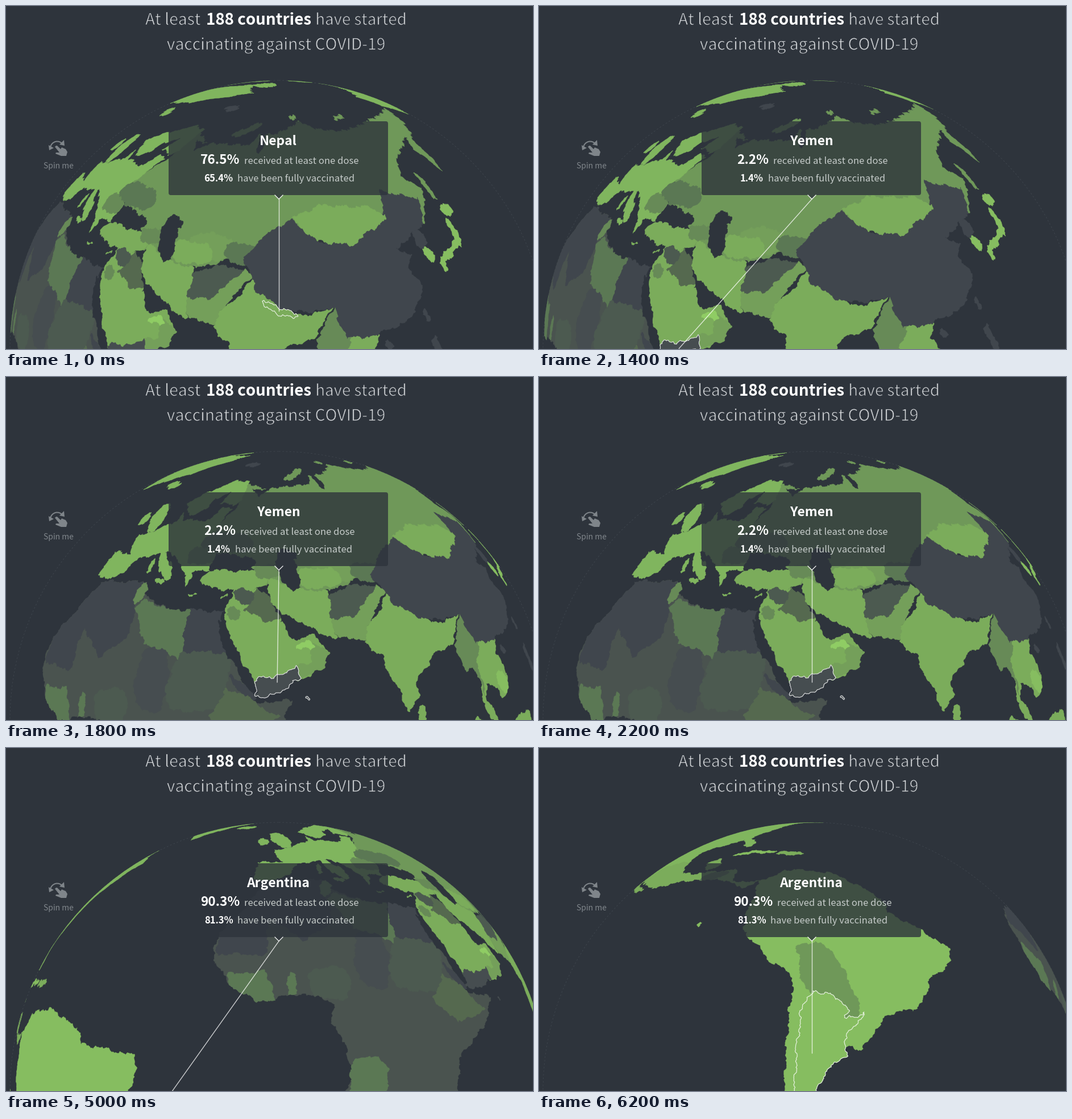
Recreate the animation shown at these times as a matplotlib script. Size 927x604 px, loop 8 s.

```python
import numpy as np
import matplotlib.pyplot as plt
from matplotlib import patheffects
from matplotlib.animation import FuncAnimation
from matplotlib.collections import PolyCollection
from matplotlib.patches import Arc, Circle, FancyBboxPatch, Polygon

W, H, DPI = 927, 604, 100
CX, CY, R = 480, 604, 473
STEP, LOOP = 200, 8000
TURN = 757          # length of one globe turn in ms
TILT = 8.2          # the view centre lies this far south of the focus

# Shades from no data to high coverage
SEA = "#2e343c"
NONE, LOW, DIM = "#40464d", "#464d50", "#4a534f"
D2, D3, D4 = "#4c5a50", "#55694f", "#5b7854"
M1, M2, M3 = "#678a57", "#6f9859", "#749f5a"
G1, G2, G3, TOP = "#7bac5b", "#80b55e", "#86bd60", "#8fcc64"

lands = []


def rough(points):
    """Close a lon/lat outline, subdivide it and make it jagged."""
    p = np.array(points, float).reshape(-1, 2)
    parts = []
    for a, b in zip(p, np.roll(p, -1, axis=0)):
        n = max(2, int(np.hypot(*(b - a)) / 0.25))
        parts.append(a + (b - a) * (np.arange(n) / n)[:, None])
    lon, lat = np.concatenate(parts).T
    dx, dy = np.zeros_like(lon), np.zeros_like(lat)
    for k in (.8, 1.7, 3.1, 5.6, 9.1):
        amp = .24 / k ** .55
        dx += amp * np.sin(k * (lat + .35 * lon) + 2 * k)
        dy += amp * np.sin(k * (lon - .45 * lat) + 5 * k)
    return np.radians(lon + dx), np.radians(lat + dy)


def land(color, *points):
    """Outline through a few lon/lat key points."""
    shape = rough(points)
    lands.append((color, shape))
    return shape


def blob(color, lon, lat, w, h):
    """Rounded box around a centre, by half width and half height."""
    a = np.linspace(0, 2 * np.pi, 40, endpoint=False)
    c, s = np.cos(a), np.sin(a)
    x = lon + w * np.sign(c) * np.abs(c) ** .75
    y = lat + h * np.sign(s) * np.abs(s) ** .75
    return land(color, *np.column_stack((x, y)).ravel())


def strip(color, lon0, lat0, lon1, lat1, w):
    """Long lens between two ends, w degrees to either side."""
    k = np.cos(np.radians((lat0 + lat1) / 2))
    dx, dy = (lon1 - lon0) * k, lat1 - lat0
    a = np.linspace(0, 2 * np.pi, 40, endpoint=False)
    along = (1 - np.cos(a)) / 2
    side = w * np.sign(np.sin(a)) * np.abs(np.sin(a)) ** .8 / np.hypot(dx, dy)
    x = lon0 + (along * dx - side * dy) / k
    y = lat0 + along * dy + side * dx
    return land(color, *np.column_stack((x, y)).ravel())


# Russia and Central Asia
land(M2, 29, 69, 41, 67, 33, 66.5, 38, 64.2, 45, 67.5, 67, 69, 70, 72.8, 80, 73,
     104, 77.5, 113, 74, 130, 71, 160, 69.8, 190, 66, 178, 62.5, 163, 59.5, 157, 51,
     156, 58, 162, 61.5, 143, 59.3, 135, 54.7, 140, 50, 132, 43, 110, 47, 80, 42,
     60, 36, 44, 38, 37, 45, 30, 46, 24, 52, 30, 60)
strip(M2, 52, 70.8, 68, 77, .9)
strip(M2, 142.3, 46, 142.8, 54.3, .6)
blob(M2, 100, 79.3, 4, .8)
blob(M2, 143, 75, 6, .6)
blob(M3, 64, 41.5, 7, 3)
blob(G1, 59, 39.5, 6, 2.5)
blob(D4, 74, 40.5, 5.5, 2.3)

# Europe
land(G2, 5, 60, 8, 58, 13, 56, 17, 59, 17.5, 62, 23, 65.7, 21.5, 61, 28, 60.5, 31, 63,
     29, 70, 20, 70, 13, 66)
land(G2, 8, 57, 10.5, 54.5, 21, 55, 24, 59.3, 28, 59.5, 24, 50, 28, 46, 28, 41.5,
     23, 40.5, 22.5, 36.7, 19.5, 41.5, 13, 45.5, 8, 44, 3, 43, 0, 39, -2, 36.8,
     -9, 37, -9, 43.3, -1.5, 43.5, -4.5, 48.3, 2, 50.5, 8, 54)
strip(G2, 9.5, 45.5, 16.8, 38, 1.2)
strip(G2, .5, 50, -5, 59, 1.7)
blob(M1, 24, 45, 4, 2.6)
blob(D4, 31, 48.8, 8.5, 2.8)
blob(G2, -8, 53.3, 1.9, 1.7)
blob(G2, -18.7, 64.9, 5, 1.3)
blob(NONE, 18, 79, 7, 1.3)
blob(G2, 14, 37.5, 1.4, .5)
blob(G2, 9, 41, .6, 1.7)
blob(G2, 25, 35.2, 1.2, .2)

# Middle East and South Asia
blob(G1, 35.3, 39, 9.2, 2.4)
blob(G1, 33.2, 35.1, .8, .3)
blob(M1, 45, 41.3, 4, 1.8)
land(G1, 44.5, 39.5, 54, 37, 61, 36, 61.5, 25.3, 57, 26.5, 50, 30, 46, 34)
land(G1, 36, 36.7, 42.5, 37, 48, 30, 51.5, 25, 56.4, 26, 59.8, 22.5, 55, 17.2,
     43.3, 12.7, 35, 28, 34.5, 31.5)
land(D3, 42.3, 37, 46, 34.5, 48, 30, 45, 29.2, 39, 32)
blob(D2, 38.8, 35.1, 2.8, 1.7)
blob(M1, 36.8, 31, 1.7, 1.2)
land(M3, 52, 19, 53, 16.6, 57.8, 19, 59.8, 22.5, 56, 24.5, 55, 20)
blob(TOP, 54.3, 23.7, 2, .8)
yemen = land(LOW, 43, 12.7, 42.7, 16.4, 47, 17, 52, 19, 53, 16.6, 49, 14.2, 45, 12.8)
island = blob(LOW, 54, 12.5, .5, .2)
land(M3, 61, 29.8, 70, 34, 74.5, 37, 77, 35.5, 70, 28, 71, 24.5, 67, 25, 61.7, 25.2)
land(D2, 61, 35.3, 67, 37.3, 74.5, 37.2, 70, 33, 66.3, 29.8, 61, 29.8)
land(G1, 68.5, 23.6, 70, 28, 74.5, 31, 77, 35.5, 88, 27, 97, 28, 92, 22, 87, 21,
     80, 15, 80, 11.5, 77.5, 8.2, 73, 18, 72.5, 21, 69.5, 22)
blob(G1, 80.7, 7.7, .9, 1.7)

# East and Southeast Asia
land(G1, 97.6, 18.5, 101, 22, 108, 21.5, 106, 18.5, 109, 14, 108.5, 11, 105, 9,
     103, 11.5, 100, 13, 99.5, 9.5, 102, 6.5, 104, 1.5, 100.5, 4.5, 98.5, 9)
blob(G3, 106.5, 12.3, 2, 2.2)
land(M1, 92.5, 21.5, 97.5, 28, 101, 21.6, 98.5, 17, 99, 10.5, 97, 16.5, 94.5, 16)
land(NONE, 74, 39.5, 80, 45, 87.5, 49, 96, 42.7, 112, 45, 120, 48, 122, 53,
     135, 48.4, 131, 43, 121, 40, 118, 39, 122, 37, 119.5, 35, 122, 30, 118, 24.4,
     108, 21.6, 100, 21.5, 97.5, 28, 86, 28, 78.5, 32.5)
land(G1, 88, 49, 98, 52, 116, 49.8, 119.8, 46.7, 105, 41.7, 95, 43.5)
nepal = strip(G1, 79.9, 29.8, 88.5, 26.8, .75)
strip(NONE, 127, 42, 127.2, 37.8, 1.4)
blob(G3, 127.8, 36.2, 1.5, 1.7)
strip(G3, 130.5, 33.8, 141, 36.5, .9)
strip(G3, 139.5, 35, 141, 41.6, .9)
blob(G3, 130.8, 32.6, .8, 1.2)
blob(G3, 143, 43.3, 2.2, 1.4)
blob(NONE, 121, 23.7, .6, 1.5)
blob(NONE, 109.8, 19.2, 1, .8)
strip(NONE, 121.3, 18.7, 123.8, 12.5, .9)
blob(NONE, 124.5, 7.7, 1.8, 1.6)
strip(G1, 95.3, 5.7, 106, -6, 1.5)
blob(G1, 114, 1, 4.5, 4)

# Africa
land(DIM, -6, 35.8, 10, 37.2, 11, 34, 20, 31, 32, 31.2, 37.3, 20.5, 43, 11.5, 51, 11.8,
     47, 4, 39.5, -4, 40.5, -14, 35, -24, 27, -33.5, 18.5, -34, 12, -17, 13.5, -9,
     9, 0, 9, 4, 4, 6.4, -7.5, 4.4, -13, 8.5, -17.3, 14.7, -16.5, 21, -10, 29.5)
land(NONE, -6, 35.8, 9, 37, 10, 24, 3, 19.2, -5, 25, -5.5, 15.5, -16.3, 16,
     -16.5, 21, -10, 29.5)
blob(M1, 9.5, 34.5, 1.4, 2.6)
land(D4, 9.8, 30.5, 11.5, 33, 20, 31, 25, 31.6, 25, 20, 15, 23)
land(NONE, 25, 31.5, 34, 31.3, 33.5, 28, 36.5, 22, 25, 22)
blob(LOW, 18.5, 15.5, 4, 7)
land(D2, 25, 22, 36.8, 22, 36.5, 14.5, 34, 9.5, 24, 9, 22, 14)
land(D3, 36.5, 14.3, 41, 13, 48, 8, 39, 3.7, 33, 8)
strip(NONE, 37, 17, 43.2, 12, .8)
land(D4, -14, 11, -6, 11.5, -3, 5, -7.5, 4.4, -13, 8.5)
blob(D4, 0, 8.3, 1, 2.6)
blob(D2, 8.5, 9, 4.5, 3.8)
blob(D4, 17.5, -12, 4.5, 5)

# Americas
land(G2, -73, 78, -35, 83.5, -20, 79, -23, 70, -43, 60, -53, 67, -60, 75.5)
land(G2, -124, 48, -123, 38, -117, 32.6, -97, 26, -94, 29.5, -82, 29.5, -81, 31,
     -75, 36, -70, 42, -56, 51, -65, 60, -78, 62, -80, 53, -93, 58, -84, 68,
     -110, 68, -135, 69, -160, 71, -167, 66, -160, 58, -145, 60.5, -130, 54)
strip(G2, -82.8, 31.5, -80.6, 24.8, 1.1)
strip(G2, -64, 63, -88, 73, 2.5)
blob(G2, -80, 80, 13, 2.3)
blob(G2, -110, 71.5, 8, 2)
land(G1, -117, 32.6, -106, 31.8, -97, 26, -97, 20.5, -94, 18.3, -88, 15.9, -83.4, 15,
     -83.5, 10.5, -77.5, 8.6, -81, 7.5, -87.5, 13, -95, 16, -105.5, 20, -113, 31)
blob(G1, -89, 19.5, 1.9, 2)
strip(G1, -116.5, 32.3, -109.8, 22.8, .8)
blob(D4, -88.5, 14.5, 3.2, 1.1)
strip(G3, -85, 22, -74.2, 20.2, .6)
strip(G1, -74.3, 18.9, -68.3, 18.7, .8)
blob(G3, -91, -.6, .4, .5)
land(G3, -77.5, 8.5, -72, 12, -62, 10.6, -51.5, 4, -50, 0, -35.2, -5.2, -34.9, -8,
     -39, -14, -41, -22, -48, -25.5, -53.5, -34, -58.3, -34, -57.2, -36.3, -62, -39,
     -65.5, -45, -69, -53, -75, -49, -73.5, -38, -70.3, -18.3, -76, -14, -81.2, -5, -80, 0)
land(M2, -69.5, -11, -65.3, -9.8, -60.3, -14, -58, -20, -54.6, -24, -55.5, -27.3,
     -58.6, -27.2, -62.6, -22.2, -67, -22.5, -69, -18)
argentina = land(G3, -66, -22, -62.6, -22.2, -57.6, -25.5, -58.6, -27.2, -55.5, -27.3,
                 -53.7, -26, -58.2, -33, -57.2, -36.3, -62, -39, -65.5, -45, -69, -52,
                 -72, -48, -70, -33, -68.4, -25)

# Inland seas and gulfs
strip(SEA, 48.5, 47, 52.5, 36.5, 2)
blob(SEA, 50.5, 45.6, 2.8, 1.2)
blob(SEA, 34.5, 43.3, 6.6, 1.9)
strip(SEA, 33, 29, 43, 13, 1.1)
strip(SEA, 48.2, 30, 56.4, 26.2, 1.1)
strip(SEA, 73, 73.5, 73, 66.5, .6)

# Each stop: start time, focus, name, shares, where each row splits, outlines
STOPS = [
    (-TURN, (84.0, 28.2), "Nepal", "76.5%", "65.4%", (415, 403.5), [nepal]),
    (1146, (47.6, 15.8), "Yemen", "2.2%", "1.4%", (408.5, 399), [yemen, island]),
    (4637, (-66.3, -35.6), "Argentina", "90.3%", "81.3%", (415, 403.5), [argentina]),
]


def ease(u):
    u = min(max(u, 0), 1)
    return 4 * u ** 3 if u < .5 else 1 - 4 * (1 - u) ** 3


def view_at(t):
    view = np.array(STOPS[0][1])
    for start, focus, *_ in STOPS[1:]:
        view = view + (np.array(focus) - view) * ease((t - start) / TURN)
    return np.radians(view - (0, TILT))


def project(lon, lat, view):
    """Orthographic position and depth towards the viewer, on a unit globe."""
    dl, lat0 = lon - view[0], view[1]
    x = np.cos(lat) * np.sin(dl)
    y = np.cos(lat0) * np.sin(lat) - np.sin(lat0) * np.cos(lat) * np.cos(dl)
    z = np.sin(lat0) * np.sin(lat) + np.cos(lat0) * np.cos(lat) * np.cos(dl)
    return x, y, z


def outline(shape, view):
    """Stage outline, hidden points pushed past the rim; None if all hidden."""
    x, y, z = project(*shape, view)
    if z.max() < 0:
        return None
    k = np.where(z < 0, 1.01 / np.maximum(np.hypot(x, y), 1e-6), 1)
    return np.column_stack((CX + R * x * k, CY - R * y * k))


def outlines(shapes, view):
    return [outline(s, view) for s in shapes]


fig = plt.figure(figsize=(W / DPI, H / DPI), dpi=DPI, facecolor=SEA)
ax = fig.add_axes([0, 0, 1, 1])
ax.set_xlim(0, W)
ax.set_ylim(H, 0)
ax.axis("off")


def px(n):
    return n * 72 / DPI


def text(x, y, s, size, color="white", weight="regular", ha="left", thin=0):
    label = ax.text(x, y, s, fontsize=px(size), color=color, weight=weight, ha=ha,
                    va="baseline", family="Noto Sans CJK JP", zorder=6)
    if thin:
        label.set_path_effects([patheffects.Stroke(linewidth=px(thin), foreground=SEA)])
    return label


# Globe
rim = Circle((CX, CY), R, fill=False, ec="#434a52", lw=.5, ls=(0, (4, 5)), zorder=1)
ax.add_patch(rim)
globe = PolyCollection([], lw=.3, zorder=2)
border = PolyCollection([], facecolors="none", edgecolors=(1, 1, 1, .8), lw=px(1.2), zorder=3)
for layer in (globe, border):
    ax.add_collection(layer, autolim=False)
    layer.set_clip_path(rim)

# Title
PALE = "#d3d6d9"
text(245, 33, "At least", 28.2, PALE, thin=.8)
text(444.5, 33, "188 countries", 27.8, weight="bold", ha="center")
text(705, 33, "have started", 27.6, PALE, ha="right", thin=.8)
text(475, 77, "vaccinating against COVID-19", 28.2, PALE, ha="center", thin=.8)

# Spin hint
GREY = "#7f858a"
ax.add_patch(Arc((90, 252), 25, 27, theta1=195, theta2=318, color=GREY, lw=px(2)))
for points in ([(75, 245), (76, 254), (84, 250)],
               [(102, 236), (103, 246), (94, 244)],
               [(86, 248), (88, 246), (90, 246), (96, 252), (98, 249), (105, 252),
                (108, 257), (106, 264), (97, 264), (87, 260), (88, 258), (94, 258)]):
    ax.add_patch(Polygon(points, color=GREY, lw=0))
text(92, 286, "Spin me", 13.9, GREY, ha="center")

# Tooltip
ax.add_patch(FancyBboxPatch((290, 207), 378, 122, boxstyle="round,pad=4,rounding_size=4",
                            fc=SEA, ec="none", alpha=.8, zorder=4))
ax.add_patch(Polygon([(473, 333), (480, 340), (487, 333)], fc=SEA, ec="none",
                     alpha=.8, zorder=4))
ax.plot([473, 480, 487], [333, 340, 333], color="white", lw=px(1.2), zorder=5)
pointer, = ax.plot([], [], color="white", alpha=.75, lw=px(1.4), zorder=5)
SOFT = "#c5cbc9"
name = text(479, 245, "", 22.8, weight="bold", ha="center")
share1 = text(0, 278, "", 22.6, weight="bold", ha="right")
share2 = text(0, 309, "", 16.7, weight="bold", ha="right")
row1 = text(0, 278, "received at least one dose", 16.65, SOFT)
row2 = text(0, 309, "have been fully vaccinated", 16.65, SOFT)


def update(i):
    t = i * STEP
    view = view_at(t)
    shapes = outlines([s for _, s in lands], view)
    seen = [(c, o) for (c, _), o in zip(lands, shapes) if o is not None]
    colors = [c for c, _ in seen]
    globe.set_verts([o for _, o in seen])
    globe.set_facecolor(colors)
    globe.set_edgecolor(colors)

    stop = [s for s in STOPS if t >= s[0]][-1]
    _, focus, title, first, full, splits, rings = stop
    border.set_verts([o for o in outlines(rings, view) if o is not None])
    x, y, _ = project(*np.radians(focus), view)
    pointer.set_data([480, CX + R * x], [340, CY - R * y])

    name.set_text(title)
    for share, row, value, split in ((share1, row1, first, splits[0]),
                                     (share2, row2, full, splits[1])):
        share.set_text(value)
        share.set_x(split - 4)
        row.set_x(split + 4)
    return globe, border, pointer, name, share1, share2, row1, row2


anim = FuncAnimation(fig, update, frames=LOOP // STEP, interval=STEP, repeat=True,
                     repeat_delay=0, blit=False)
plt.show()
```
